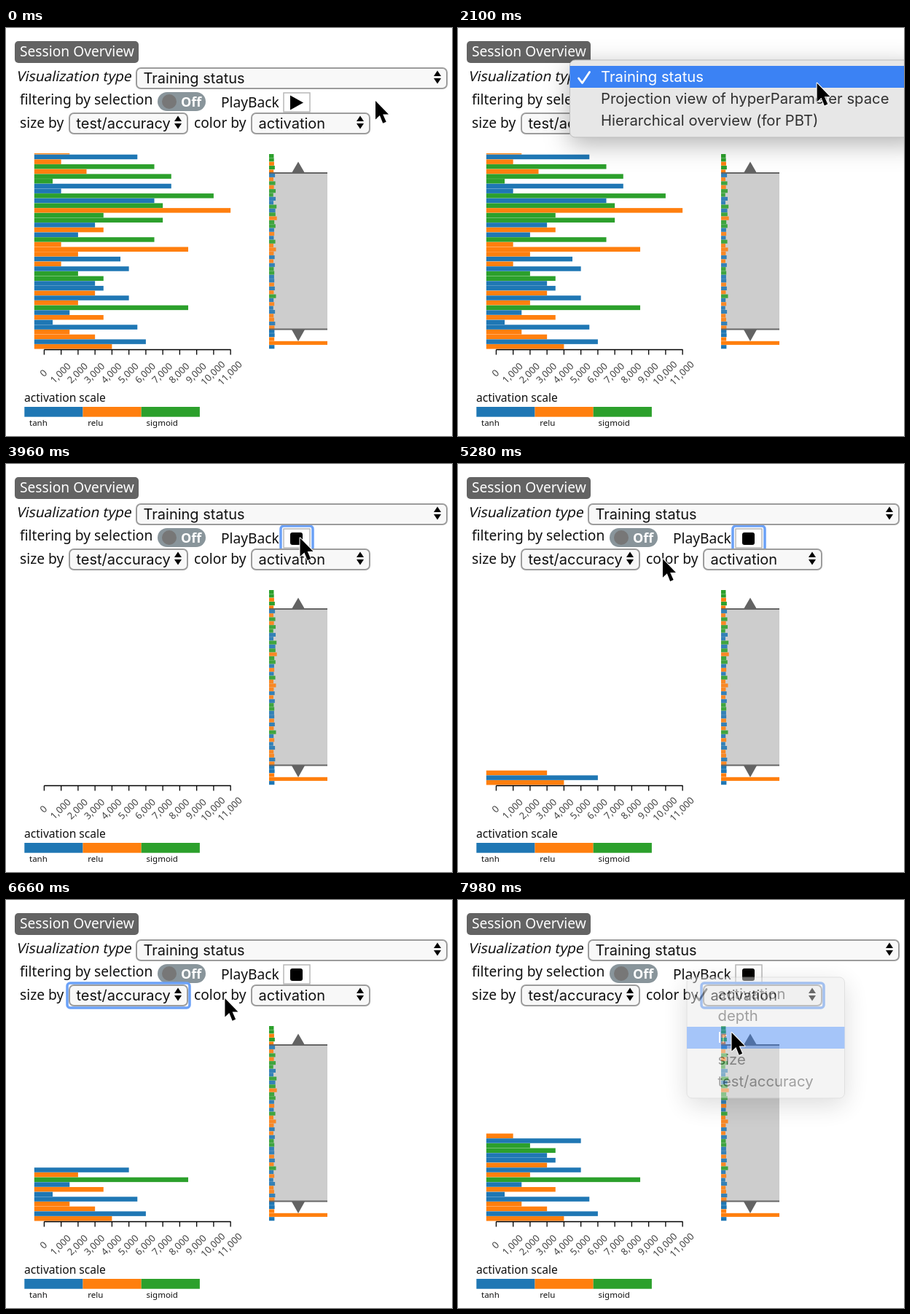
These frames come from a looping animation (612 by 560 pixels, 8000 ms). An HTML page:

```html
<!DOCTYPE html>
<html lang="en">
<head>
<meta charset="utf-8">
<title>Session Overview</title>
<style>
  html, body { margin: 0; width: 100%; height: 100%; overflow: hidden; background: #fff; }
  svg { display: block; width: 612px; height: 560px; }
  text { font: 19.2px "Noto Sans", sans-serif; fill: #111; white-space: pre; }
  .ui { font: 20px Inter, sans-serif; }
  .axis { font-size: 13px; font-weight: 300; text-anchor: middle; fill: #444; }
  .key { font-size: 11.5px; font-weight: 300; }
  .menu { filter: drop-shadow(0 9px 17px rgba(0, 0, 0, .3)); }
  .menu .ui { font-size: 20.3px; fill: #303030; }
  .menu .ui.on { fill: #fff; }
  .check { fill: none; stroke: #303030; stroke-width: 2.8; stroke-linecap: round; stroke-linejoin: round; }
  .check.on { stroke: #fff; }
</style>
</head>
<body>
<svg id="stage" viewBox="0 0 612 560"></svg>
<script>
const LOOP = 8000, STEP = 60;
const COLORS = { b: '#1f77b4', o: '#ff7f0e', g: '#2ca02c' };
// Colour letter and value in units of 500, top to bottom; rows 5 to 44 are inside the brush.
const ROWS = ('g4 g5 o6 g10 o3 b11 o2 g13 o5 g15 g1 b15 b2 g20 b13 g14 o22 g7 g14 b6 o7 b4 g13 o2 o17 o4 b9 o2 b10 ' +
  'g4 g7 b6 b7 o6 b10 o4 g17 b3 o7 b1 b11 o3 o6 b12 o8 b8 b9 o7 o320 b8')
  .split(' ').map(s => ({ color: COLORS[s[0]], value: +s.slice(1) }));
const FIRST = 5, SHOWN = 40;

const stage = document.getElementById('stage');

function add(parent, tag, attrs, content) {
  const node = document.createElementNS('http://www.w3.org/2000/svg', tag);
  for (const key in attrs) node.setAttribute(key, attrs[key]);
  if (content !== undefined) node.textContent = content;
  parent.appendChild(node);
  return node;
}
const group = (parent, attrs = {}) => add(parent, 'g', attrs);
const path = (parent, d, attrs = {}) => add(parent, 'path', { d, ...attrs });
const label = (x, y, content, attrs = {}) => add(stage, 'text', { x, y, ...attrs }, content);
const box = (parent, x, y, width, height, fill, attrs = {}) =>
  add(parent, 'rect', { x, y, width, height, fill, ...attrs });
const show = (node, visible) => node.setAttribute('visibility', visible ? 'visible' : 'hidden');

function focusRing(x, y, w, h) {
  return box(stage, x, y, w, h, 'none', { rx: 4, stroke: '#6ba1f7', 'stroke-width': 3.5 });
}

function select(x, y, w, content) {
  box(stage, x + 1, y + 1, w - 2, 28, '#f8f8f8', { rx: 6, stroke: '#9c9c9c', 'stroke-width': 2 });
  label(x + 10.5, y + 22, content, { class: 'ui' });
  const ax = x + w - 14;
  path(stage, `M${ax - 5} ${y + 12}h10l-5 -7.5zM${ax - 5} ${y + 15}h10l-5 7.5z`);
  return focusRing(x - 2, y - 2, w + 4, 34);
}

function menu(x, y, w, items) {
  const node = group(stage, { class: 'menu' });
  const h = items.length * 30 + 16;
  box(node, x, y, w, h, '#e7e7e7', { rx: 7, stroke: '#bdbdbd', 'stroke-width': 1 });
  const mark = box(node, x, y + 8, w, 30, '#3b82f4');
  const check = path(node, `M${x + 12} ${y + 25}l5 6.5l10 -15`);
  const texts = items.map((item, i) => add(node, 'text', { x: x + 42.5, y: y + 30 + 30 * i }, item));
  return {
    draw(opacity, active) {
      node.setAttribute('opacity', opacity);
      show(node, opacity > 0);
      mark.setAttribute('y', y + 8 + 30 * active);
      check.setAttribute('class', active === 0 ? 'check on' : 'check');
      texts.forEach((t, i) => t.setAttribute('class', i === active ? 'ui on' : 'ui'));
    }
  };
}

// Controls
box(stage, 12, 18, 170, 30, '#636363', { rx: 5 });
label(19, 39, 'Session Overview', { style: 'fill:#fff;font-weight:500' });
label(0, 0, 'Visualization type', { transform: 'translate(14 73) skewX(-12)' });
label(19, 105, 'filtering by selection');
box(stage, 208, 88, 66, 26, '#89959b', { rx: 13 });
add(stage, 'circle', { cx: 224, cy: 101, r: 10, fill: '#777' });
label(240, 108, 'Off', { style: 'fill:#fff;font-weight:700;font-size:18px' });
label(295, 109, 'PlayBack');
label(19, 137, 'size by');
label(258, 137, 'color by');
box(stage, 381, 89, 36, 26, '#fff', { stroke: '#b8b8b8', 'stroke-width': 1.5 });
const playIcon = path(stage, 'M390 92.5v20l18 -10z');
const stopIcon = box(stage, 390, 94, 17, 17, '#000', { rx: 3 });
const playRing = focusRing(377, 85, 44, 36);
const typeRing = select(178, 54, 428, 'Training status');
const sizeRing = select(86, 116, 164, 'test/accuracy');
const colorRing = select(336, 116, 164, 'activation');

// Main chart
const chartLeft = 38.8, chartBottom = 440.7, barPitch = 6.675;
const tickX = value => 52.4 + value * 11.625;
const drawBar = (row, y, h) => box(stage, chartLeft, y, tickX(row.value) - chartLeft, h, row.color);
const bars = [drawBar(ROWS[FIRST - 1], 172, 1.5)];
for (let i = 0; i < SHOWN; i++) {
  bars.push(drawBar(ROWS[FIRST + i], chartBottom - (SHOWN - i) * barPitch, 6.5));
}
path(stage, 'M52.4 441.5H308.5', { stroke: '#000', 'stroke-width': 1.3 });
for (let i = 0; i <= 11; i++) {
  const x = tickX(i * 2);
  path(stage, `M${x} 441.5v7`, { stroke: '#000', 'stroke-width': 1.3 });
  label(0, 5, i ? i + ',000' : '0', { class: 'axis', transform: `translate(${x - 1.2} 473.3) rotate(-45)` });
}

// Overview and brush
box(stage, 361, 199, 80, 214.5, '#cdcdcd');
ROWS.forEach((row, i) => {
  const inside = i >= FIRST && i < FIRST + SHOWN;
  box(stage, 361, 173 + i * 5.35, Math.min(80, 5.5 + row.value * .235), 5.1, row.color,
    { opacity: inside ? .88 : 1 });
});
path(stage, 'M361 199H441M361 413.5H441', { stroke: '#666', 'stroke-width': 2 });
path(stage, 'M392 199h18l-9 -15.5zM392 414h18l-9 16z', { fill: '#636363' });

// Legend
label(25, 513, 'activation scale', { style: 'font-size:15.6px' });
[['tanh', 'b'], ['relu', 'o'], ['sigmoid', 'g']].forEach(([name, c], i) => {
  box(stage, 25.3 + i * 80.2, 520, 80.2, 13.7, COLORS[c]);
  label(32 + i * 80.3, 546, name, { class: 'key' });
});

// Menus and pointer
const typeMenu = menu(153.5, 44, 480,
  ['Training status', 'Projection view of hyperParameter space', 'Hierarchical overview (for PBT)']);
const sizeMenu = menu(66, 106, 216, ['test/accuracy']);
const colorMenu = menu(314, 106, 216.5, ['activation', 'depth', 'lr', 'size', 'test/accuracy']);
const press = add(stage, 'circle', { r: 43.5, fill: 'none', stroke: '#000', 'stroke-width': 2.5 });
const pointer = path(stage, 'M1 1V26.5L6.9 21L11.2 31.7L15.7 29.8L11.2 19.6H19Z',
  { stroke: '#fff', 'stroke-width': 2, 'stroke-linejoin': 'round', 'paint-order': 'stroke' });

// time, x, y
const TRACK = [
  [0, 506, 99], [300, 506, 99], [1020, 493, 74], [1600, 493, 74], [2400, 491, 75], [2640, 491, 75],
  [3420, 402.5, 100.5], [4500, 402.5, 100.5], [5520, 260, 134], [6540, 260, 134],
  [6840, 372, 134], [6960, 372, 134], [7320, 374.5, 181], [LOOP, 374.5, 181]
];
const PRESSES = [[1140, 1500], [3480, 3780], [5640, 5940], [6840, 7080], [7620, 7800]];
const within = (t, from, to) => t >= from && t < to;

function pointerAt(t) {
  const i = TRACK.findIndex(p => p[0] > t);
  const [t0, x0, y0] = TRACK[i - 1], [t1, x1, y1] = TRACK[i];
  const k = (t - t0) / (t1 - t0), e = k * k * (3 - 2 * k);
  return [x0 + (x1 - x0) * e, y0 + (y1 - y0) * e];
}

function menuOpacity(t, open, close) {
  return t < open ? 0 : Math.max(0, Math.min(1, 1 - (t - close) / 220));
}

function render(t) {
  const [x, y] = pointerAt(t);
  pointer.setAttribute('transform', `translate(${x} ${y})`);
  press.setAttribute('cx', x);
  press.setAttribute('cy', y);
  show(press, PRESSES.some(([from, to]) => within(t, from, to)));

  typeMenu.draw(menuOpacity(t, 1200, 2340), 0);
  sizeMenu.draw(menuOpacity(t, 5700, 6360), 0);
  colorMenu.draw(menuOpacity(t, 6900, 7860), Math.max(0, Math.floor((y - 114) / 30)));

  const playing = t >= 3660;
  show(typeRing, within(t, 1200, 3480));
  show(playRing, within(t, 3480, 5700));
  show(sizeRing, within(t, 5700, 6900));
  show(colorRing, t >= 6900);
  show(playIcon, !playing);
  show(stopIcon, playing);

  const count = playing ? Math.floor((t - 4700) / 175) : bars.length;
  bars.forEach((bar, i) => show(bar, bars.length - i <= count));
}

function tick() {
  const t = performance.now() % LOOP;
  render(Math.floor(t / STEP) * STEP);
  requestAnimationFrame(tick);
}
tick();
</script>
</body>
</html>
```
